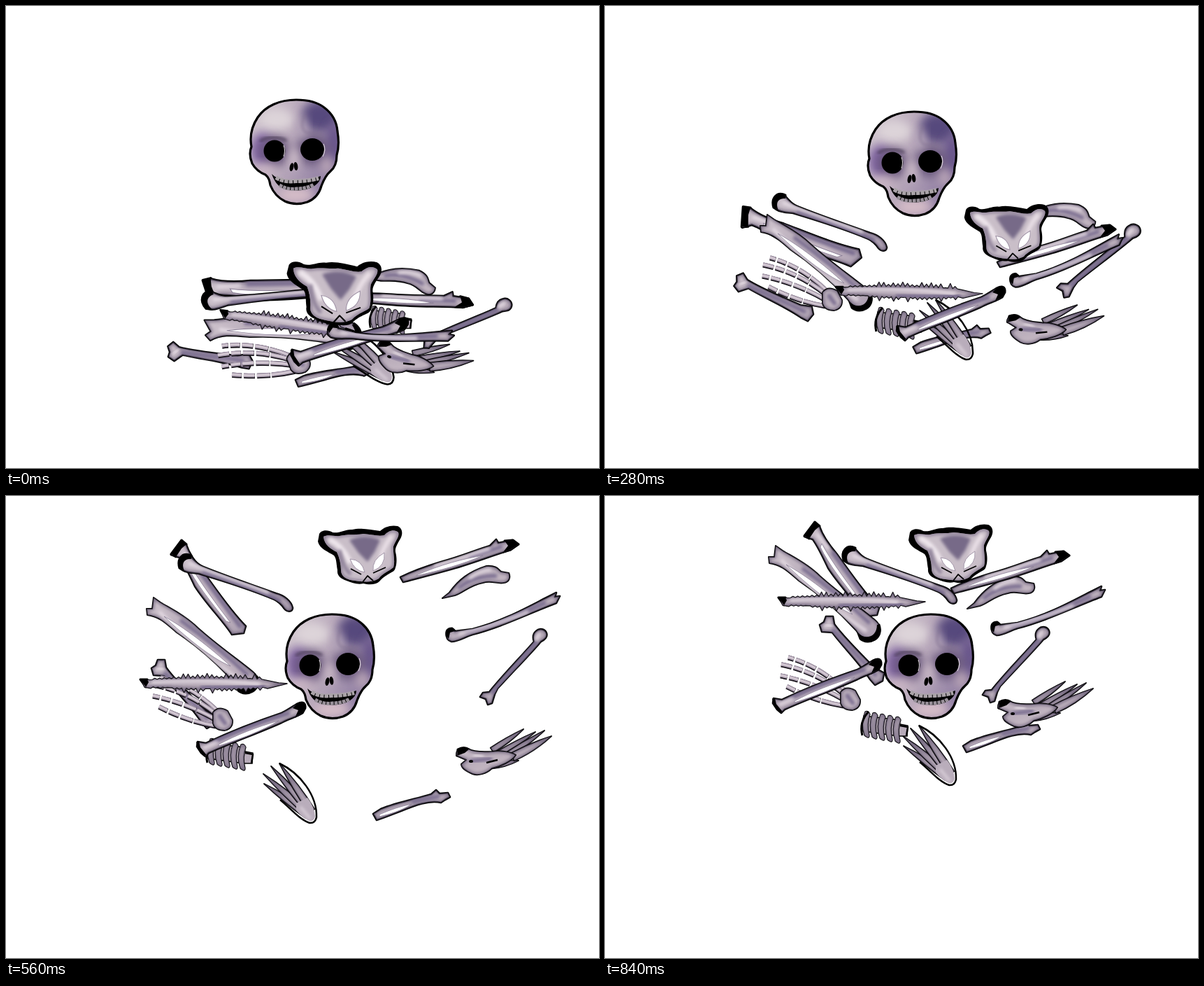
Write an HTML page that moves like this. It is 848 px wide and 660 px high and loops after 980 ms.

```html
<!DOCTYPE html>
<html lang="en">
<head>
<meta charset="utf-8">
<title>Dancing bones</title>
<style>
  html, body { margin: 0; width: 100%; height: 100%; overflow: hidden; background: #fff; }
  svg { display: block; width: 100%; height: 100%; }
</style>
</head>
<body>
<svg id="stage" viewBox="0 0 848 660">
  <defs>
    <linearGradient id="bone" x1="0" y1="0" x2="1" y2="1">
      <stop offset="0" stop-color="#d2c7d0"/>
      <stop offset=".35" stop-color="#b7abb9"/>
      <stop offset=".7" stop-color="#c5b8c3"/>
      <stop offset="1" stop-color="#a79aad"/>
    </linearGradient>
    <linearGradient id="skull" x1="0" y1=".1" x2="1" y2=".5">
      <stop offset="0" stop-color="#d3c9d0"/>
      <stop offset=".5" stop-color="#b9a9bb"/>
      <stop offset="1" stop-color="#8d7ba1"/>
    </linearGradient>
    <filter id="soft" x="-30%" y="-30%" width="160%" height="160%"><feGaussianBlur stdDeviation="2"/></filter>
    <filter id="softer" x="-60%" y="-60%" width="220%" height="220%"><feGaussianBlur stdDeviation="7"/></filter>
  </defs>
</svg>
<script>
const STEP = 140, STEPS = 7;
const stage = document.getElementById('stage');
const parts = [];

const fill = (d, color, extra = '') => `<path d="${d}" fill="${color}" ${extra}/>`;
const line = (d, color, width, extra = '') =>
  `<path d="${d}" fill="none" stroke="${color}" stroke-width="${width}" stroke-linejoin="round" ${extra}/>`;
const oval = (x, y, rx, ry, color, extra = '') =>
  `<ellipse cx="${x}" cy="${y}" rx="${rx}" ry="${ry}" fill="${color}" ${extra}/>`;
const soft = 'filter="url(#soft)"';

// Each pose reads "dx,dy,turn,scale" around the pivot.
function part(pivot, poses, markup) {
  const node = document.createElementNS('http://www.w3.org/2000/svg', 'g');
  node.innerHTML = markup;
  stage.append(node);
  parts.push({ node, pivot, poses: poses.split(' ').map(p => p.split(',').map(Number)) });
}

let clips = 0;
function clipped(outline, inside) {
  const id = 'clip' + clips++;
  return `<clipPath id="${id}"><path d="${outline}"/></clipPath><g clip-path="url(#${id})">${inside}</g>`;
}

function bone(outline, { cap = '', hollow = '', shade = '', shine = '', edge = 2.6 } = {}) {
  return fill(cap, '#000', 'stroke="#000" stroke-width="3" stroke-linejoin="round"')
    + fill(outline, 'url(#bone)', `stroke="#000" stroke-width="${edge}" stroke-linejoin="round"`)
    + clipped(outline, line(outline, '#62566f', 5, soft + ' opacity=".75"')
      + line(shade, '#75688c', 5, soft)
      + line(shine, '#e6dde5', 4, soft)
      + fill(hollow, '#fff', 'stroke="#8a7e96" stroke-width=".8"'))
    + fill(cap, '#000');
}

// A narrow digit that comes to a point at (x, y).
const digit = (x, y, bx, by, w) => {
  const len = Math.hypot(bx - x, by - y), nx = (by - y) / len * w, ny = (x - bx) / len * w;
  const mx = (x + bx) / 2, my = (y + by) / 2;
  return `M${x} ${y} Q${mx + nx * 1.4} ${my + ny * 1.4} ${bx + nx} ${by + ny}
    L${bx - nx} ${by - ny} Q${mx - nx} ${my - ny} ${x} ${y}Z`;
};

// Shoulder blade
part([651, 102], '-83,288,30 -51,268,30 4,195,28 58,91,-8 22,20 0,0 -84,35',
  bone('M602 126 L612 118 C625 100 640 88 665 80 C680 79 682 85 686 88 L697 90 C700 97 697 103 690 104 C680 106 672 100 660 104 C640 108 632 118 620 122Z',
    { shade: 'M625 112 Q645 94 680 94', shine: 'M640 98 Q655 86 672 85', edge: 2.2 }));

// Upper right limb
part([646, 71], '-71,349,20,1.05 -61,305,18 -1,272 47,177 2,22 0,0 -67,38',
  bone('M562 94 C580 85 600 78 620 72 C650 64 670 55 690 49 L699 40 L702 45 L722 41 L731 47 L720 55 C690 64 660 76 630 84 C605 91 585 96 566 101Z',
    { cap: 'M711 42 L723 41 L731 47 L719 55 L709 58 L716 49Z',
      hollow: 'M585 91 C620 76 650 68 680 63 C650 76 620 84 585 92Z',
      shade: 'M660 66 L708 50', shine: 'M610 78 L690 53' }));

// Upper left limb
part([304, 116], '74,284,-55,1.25 52,252,-56,1.25 -27,211,-33,1.15 -47,62 -14,14 0,0 35,-12',
  bone('M250 70 L264 52 L272 56 C276 68 284 80 296 94 C315 120 335 150 357 172 L354 182 L337 184 C325 165 300 140 284 115 C276 98 268 82 262 74Z',
    { cap: 'M250 69 L265 49 L272 55 L265 61 L257 73Z',
      hollow: 'M275 80 C288 105 316 142 335 167 L329 165 C305 135 285 110 273 85Z',
      shade: 'M290 92 Q320 135 350 174', shine: 'M268 66 L285 88' }));

// Ball-headed limb
part([383, 92], '-8,324,-25,1.08 -47,294,-24,1.08 -61,217 -103,142 -54,32 0,0 39,21',
  bone('M303 60 C303 52 314 50 320 56 C325 61 328 66 336 69 C370 83 410 96 440 107 C452 110 462 118 464 128 C463 134 456 134 452 129 C448 123 444 119 438 116 C400 100 360 88 330 79 C322 78 310 78 304 72Z',
    { cap: 'M319 53 C306 47 298 58 302 71 L309 75 C304 64 309 57 319 58Z',
      shade: 'M335 76 Q390 93 447 118', shine: 'M315 64 Q370 84 430 106' }));

// Thick left limb
part([288, 192], '107,271,-36,1.15 94,223,-33,1.3 15,173 5,118 -6,20 0,0 27,-54',
  bone('M208 150 L207 141 L215 141 L217 125 L227 132 C240 140 262 150 280 168 C310 195 340 215 360 232 C369 240 368 252 360 258 C350 262 338 256 332 246 C310 222 280 195 250 175 C235 162 225 152 208 150Z',
    { cap: 'M365 238 C372 258 350 268 338 258 L335 250 C345 260 362 256 362 238Z',
      hollow: 'M232 152 C260 167 300 198 327 223 C300 212 262 181 232 152Z',
      shade: 'M255 157 Q310 197 352 236', shine: 'M225 145 Q290 210 347 247', edge: 2 }));

// Forearm
part([353, 221], '-62,280,-39 -85,258,-40 -112,196,-22 -122,118 -99,62 -100,28 0,0',
  bone('M307 184 L313 180 L316 172 L326 172 L328 183 C340 200 365 225 385 245 L399 253 L397 264 L386 270 L379 262 C365 240 340 215 325 195 L310 194Z',
    { shade: 'M325 190 L388 257', shine: 'M315 184 L325 186' }));

// Left hand
const fingers = [
  'M345 279 Q307 242 262 230', 'M345 285 Q305 251 252 240',
  'M343 291 Q300 266 251 256', 'M341 299 Q302 293 259 271'
];
const joints = 'stroke-dasharray="32 2 18 3 15 3 13 3"';
part([308, 267], '60,236,-22,1.05 39,206,-22,1.05 -26,129 -34,66 -41,29 -39,15 0,0',
  fingers.map(d => `<g transform="translate(0 1)">${line(d, '#17131a', 7, joints)}</g>`
    + line(d, '#a99cae', 5.5, joints) + line(d, '#d5cad4', 2.5, joints)).join('')
  + bone('M337 280 Q345 270 358 278 L365 291 Q366 303 354 306 Q340 306 337 296Z',
    { shade: 'M345 283 L356 298', edge: 1.8 }));

// Spine
function spineOutline() {
  let seed = 7;
  const random = () => (seed = seed * 16807 % 2147483647) / 2147483647;
  const top = [], bottom = [];
  for (let x = 188; x <= 350; x += 3.4) {
    const bulge = Math.sin((x - 180) / 190 * Math.PI) * 3;
    const spike = () => random() * (x > 235 ? 7 : 2.5) * (Math.round(x / 3.4) % 2);
    top.push(`${x} ${184 - bulge - spike()}`);
    bottom.unshift(`${x + 1} ${193 + bulge + spike()}`);
  }
  return `M175 183 L${top.join('L')} L372 188 L384 189 L356 196 L${bottom.join('L')} L180 194Z`;
}
part([279, 189], '131,266,8 69,233,8 156,220,1 60,171,1 18,79 0,0 74,-38',
  bone(spineOutline(), { cap: 'M174 183 L184 183 L186 187 L182 194Z',
    shade: 'M260 195 Q310 195 352 192', shine: 'M190 187 Q280 182 345 190', edge: 1.4 }));

// Small lower bone
part([620, 420], '-150,108,6 -144,92,6 -124,57,2 -68,37 -40,22 0,0 -53,-75',
  bone('M565 432 L576 425 C600 415 630 410 648 404 L655 398 L660 403 L672 402 L675 408 L668 412 L662 416 C645 412 625 420 605 428 C592 433 580 438 570 441Z',
    { hollow: 'M574 433 C590 426 605 421 620 418 C605 428 590 432 574 436Z', shade: 'M620 415 L660 407' }));

// Fanned foot
const fan = [[422, 408], [421, 394], [432, 383], [444, 379]];
part([460, 422], '50,80,-10,1.05 80,53,-8,1.05 29,41 -31,23 -53,3 0,0 5,-51',
  fan.map(([x, y], i) => bone(digit(x, y, 484 + i * 2, 453 - i * 2, 5), { edge: 1.8 })).join('')
  + line('M444 379 C474 393 498 425 497 456 Q495 465 487 464 C472 459 460 443 445 431', '#000', 2.5)
  + fill('M468 436 L484 428 Q494 440 495 455 Q493 463 486 461 Q476 456 468 446Z', '#b9adbb')
  + line('M474 441 L488 458', '#e0d6df', 3, soft));

// Right foot
const toes = [[757, 274, 712, 304, 4], [774, 278, 722, 309, 4], [787, 276, 732, 312, 4], [750, 319, 708, 326, 5], [797, 284, 741, 314, 6]];
part([729, 306], '-132,198,20 -156,180,18 -86,149,8 -45,104 -17,59 0,0 -99,-9',
  toes.map(([x, y, bx, by, w]) => bone(digit(x, y, bx, by, w), { edge: 1.8 })).join('')
  + bone('M661 312 C660 302 670 300 678 302 C688 308 704 306 712 306 C722 304 738 306 746 311 C740 320 725 327 712 330 C704 338 692 341 684 338 C675 334 668 330 668 324 L675 318Z',
    { cap: 'M663 303 Q672 298 679 303 L673 308 L662 312Z', shade: 'M680 320 L712 316', shine: 'M685 311 L700 313', edge: 2 })
  + line('M704 322 L720 318', '#000', 2.5) + oval(682, 320, 3, 2, '#000'));

// Short run of vertebrae
const discs = [0, 1, 2, 3, 4].map(i => {
  const x = 317 + i * 11, y = 361 + i * 2;
  return `M${x} ${y} q-7 17 -1 34 q7 6 7 0 q-4 -16 1 -30 q-2 -6 -7 -4Z`;
}).join('');
part([345, 381], '205,66,0,.9 177,41 75,70 5,26 -25,-14 0,0 55,-53',
  fill('M315 367 L365 373 L367 379 L378 381 L377 396 L365 396 L314 389Z', '#b7abb9', 'stroke="#000" stroke-width="1.5"')
  + bone(discs, { edge: 1.3 })
  + line('M322 361 Q308 376 313 395', '#000', 3) + line('M367 381 L378 383 L376 396', '#000', 2.5));

// Lower left limb
part([322, 324], '168,156,5,1.05 130,119,4,1.05 172,116 100,60 28,10 0,0 -5,-52',
  bone('M245 348 L246 341 L258 343 C290 328 330 312 366 300 C378 294 384 288 392 286 C400 286 400 294 396 300 C388 306 376 308 366 314 C330 330 295 342 262 357 L257 362 L251 357Z',
    { cap: 'M388 287 Q401 281 400 293 L396 300 L386 305 L390 296 L382 293Z',
      hollow: 'M276 345 C300 332 330 320 362 311 C340 325 305 338 276 347Z',
      shade: 'M270 341 Q320 317 378 300', shine: 'M254 350 L275 341' })
  + line('M246 341 L248 350 L257 361', '#000', 4));

// Right forearm
part([695, 204], '-38,249,25,1.05 -16,215,20,1.1 11,160,9,1.1 33,86 31,40 0,0 -107,37',
  bone('M727 153 C732 148 740 150 742 156 C744 162 738 166 734 168 C715 190 690 215 672 235 L668 243 L664 256 L658 258 L655 250 L647 247 L651 241 L660 240 C680 215 705 190 724 168 C722 162 722 157 727 153Z',
    { shade: 'M728 168 L664 242', shine: 'M732 156 L726 166' }));

// Long right limb
part([704, 140], '-154,328,22,1.05 -122,300,18,1.08 -44,224,-2 -10,141 7,33 0,0 -70,24',
  bone('M623 165 C624 157 632 155 635 160 L660 157 C700 147 735 128 764 113 L780 105 L778 111 L785 110 L780 120 C740 135 700 155 660 165 C650 168 640 175 630 175 C624 173 623 170 623 165Z',
    { cap: 'M623 167 Q621 156 631 156 L635 160 L628 162 L626 171Z',
      shade: 'M650 162 Q710 145 765 119', shine: 'M640 164 Q700 149 740 132' }));

// Pelvis
const hip = 'M443 28 C450 24 458 28 466 27 C478 24 488 26 500 24 C512 25 522 28 530 26 C538 18 545 18 550 22 C552 28 546 34 543 42 C542 52 546 62 543 72 C536 78 528 80 522 88 C510 95 498 92 488 91 C478 90 468 86 468 76 C468 68 466 58 462 50 C454 46 444 40 443 28Z';
part([495, 55], '-28,354,4,1.12 32,309,4,1.12 78,269,2 113,188 11,30 0,0 -1,28',
  fill('M437 24 C440 18 450 18 456 22 C466 24 474 17 484 18 C496 15 510 18 524 20 C530 14 540 11 549 13 C556 16 557 24 553 31 C549 38 545 44 546 50 C548 58 548 66 546 72 C545 78 540 79 537 81 C532 84 528 86 523 92 C518 97 508 97 500 95 C492 97 484 94 476 91 C468 88 462 84 463 76 C461 66 462 60 458 55 C450 50 437 45 435 35Z', '#000')
  + fill(hip, '#c9bec8')
  + clipped(hip, line(hip, '#84778f', 4, soft)
    + fill('M480 33 Q502 23 524 33 L516 50 L506 64 L493 51Z', '#776a88', soft)
    + line('M451 32 Q472 42 481 66', '#eee6ec', 7, soft)
    + line('M541 27 Q527 43 522 68', '#e9dfe6', 6, soft)
    + line('M466 47 Q470 72 482 82', '#8e8199', 5, soft)
    + fill('M481 60 Q498 61 502 79 Q487 77 481 60Z', '#fff', 'stroke="#a194a7"')
    + fill('M514 77 Q512 61 530 51 Q532 70 514 77Z', '#fff', 'stroke="#a194a7"'))
  + line('M482 74 L497 82 M514 80 L532 72 M499 93 L506 84 L514 91', '#000', 1.8));

// Skull
const head = 'M466 169 C482 169 496 172 506 180 C518 189 524 201 525 214 C527 226 527 238 524 248 C524 258 521 266 515 271 C508 277 505 284 502 292 C499 303 492 311 482 315 C470 319 459 318 450 314 C440 309 433 301 429 291 C428 285 427 280 422 276 C414 273 407 267 403 260 C399 250 399 243 402 236 C399 220 403 206 411 194 C422 178 442 169 466 169Z';
const blur = 'filter="url(#softer)"';
part([463, 243], '-51,-35 -51,-35 -24,-18 0,0 0,0 0,0 0,0',
  fill(head, 'url(#skull)')
  + clipped(head, oval(500, 192, 26, 22, '#57487d', blur) + oval(520, 232, 11, 30, '#66538a', blur)
    + oval(438, 197, 25, 16, '#ddd4d9', blur) + oval(417, 240, 16, 24, '#8063a3', blur)
    + oval(435, 242, 22, 22, '#69577c', blur) + oval(490, 240, 24, 22, '#68567b', blur)
    + oval(474, 208, 7, 16, '#b2a3b8', blur) + oval(463, 252, 7, 15, '#d0c0cb', blur)
    + oval(466, 305, 26, 12, '#d6bdc8', blur) + oval(420, 269, 17, 8, '#cbb5c4', blur)
    + oval(510, 263, 9, 13, '#bca7b7', blur)
    + line('M479 190 Q470 208 480 216 Q488 217 503 217', '#80708f', 2, soft)
    + line('M414 228 Q431 218 452 227', '#463a53', 3, soft))
  + line(head, '#000', 3.2)
  + oval(435, 242, 15.5, 15.5, '#000') + oval(489, 240, 17, 16, '#000')
  + line('M448 234 Q451 241 448 250 M505 232 Q509 240 504 250', '#d8d0d8', 1.2)
  + oval(459.5, 265, 2.8, 6, '#000', 'transform="rotate(12 459 265)"')
  + oval(465.5, 264, 2.8, 6, '#000', 'transform="rotate(-8 465 264)"')
  + fill('M431 275 C440 284 452 284 464 284 C481 284 493 281 501 278 Q501 286 492 292 C481 299 468 299 455 298 C442 296 435 287 431 275Z', '#000')
  + line('M437 280 Q449 287 465 285 Q484 285 498 281', '#aaa3a8', 6, 'stroke-dasharray="5.5 1"')
  + line('M442 291 Q454 298 467 296 Q481 296 491 290', '#99919a', 5, 'stroke-dasharray="4.7 1"'));

function render(ms) {
  const step = Math.floor(ms / STEP) % STEPS;
  for (const { node, pivot: [cx, cy], poses } of parts) {
    const [dx, dy, turn = 0, scale = 1] = poses[step];
    node.setAttribute('transform',
      `translate(${cx + dx} ${cy + dy}) rotate(${turn}) scale(${scale}) translate(${-cx} ${-cy})`);
  }
}

function tick() {
  render(performance.now());
  requestAnimationFrame(tick);
}
tick();
</script>
</body>
</html>
```
